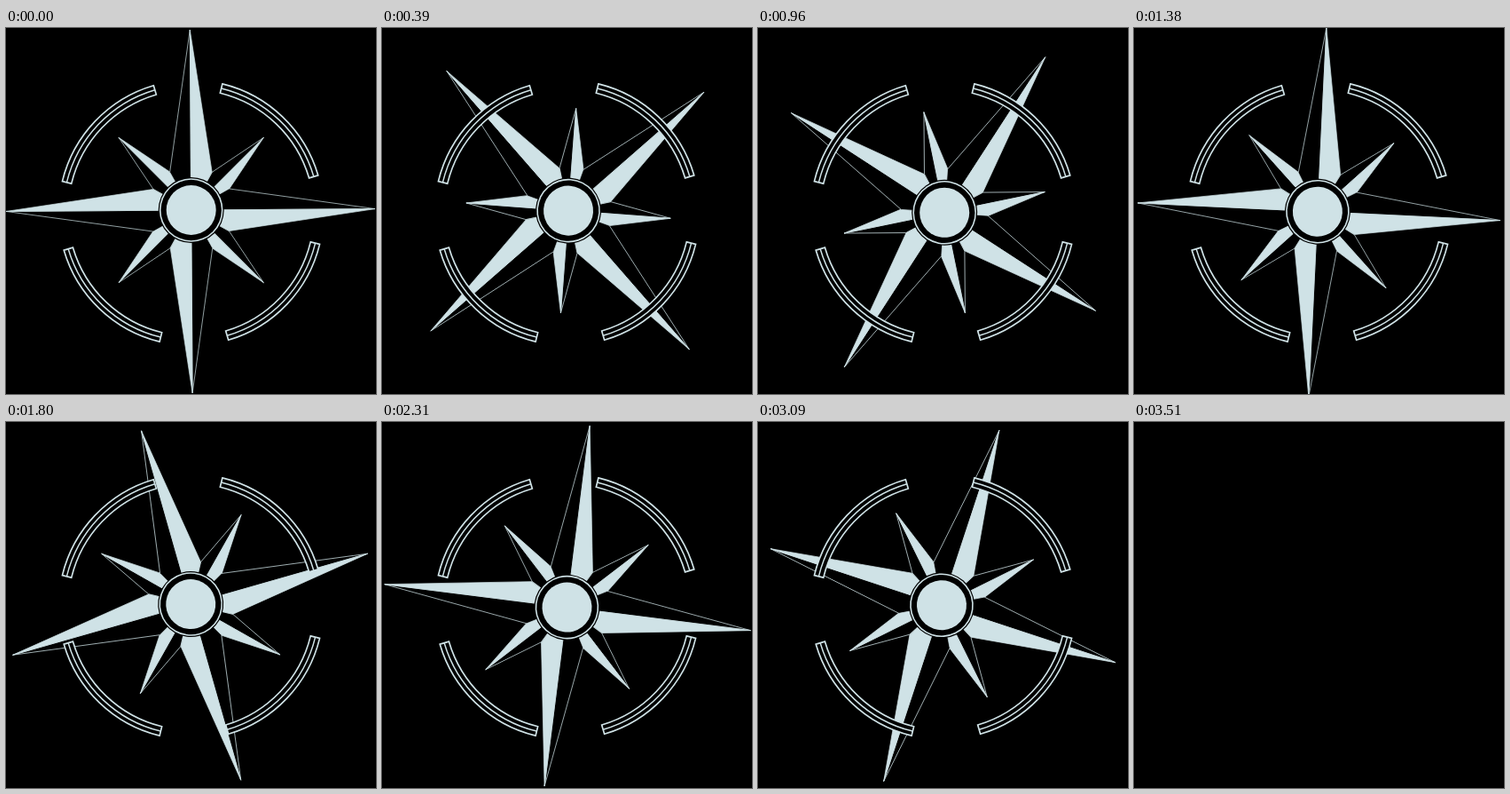
Write an HTML page with a canvas that moves like this. It is 417 px wide and 412 px high and loops after 5370 ms.

```html
<!DOCTYPE html>
<html>
<head>
<meta charset="utf-8">
<style>
  html, body { margin: 0; height: 100%; overflow: hidden; background: #000; }
  canvas { display: block; }
</style>
</head>
<body>
<canvas id="stage" width="417" height="412"></canvas>
<script>
const ctx = document.getElementById('stage').getContext('2d');
const LIGHT = '#cfe2e6', DARK = '#000';
const LOOP = 5370, STEP = 30, FADE_FROM = 3240, FADE_TO = 3510;
const RAD = Math.PI / 180;

// Needle swings: [time in ms, angle in degrees]
const SWING = [[0, 0], [861, 115.6], [1710, 350.3], [2520, 157.3], [3189, 296]];
const LONG = [203, 207.3, 206, 208.7];
const SHORT = 115.5;

function angleAt(t) {
  for (let i = 1; i < SWING.length; i++) {
    const [t0, a0] = SWING[i - 1], [t1, a1] = SWING[i];
    if (t < t1) return a0 + (a1 - a0) * (1 - Math.cos(Math.PI * (t - t0) / (t1 - t0))) / 2;
  }
  return SWING[SWING.length - 1][1];
}

// Point at a bearing, clockwise from up
const polar = (deg, r) => [r * Math.sin(deg * RAD), -r * Math.cos(deg * RAD)];

function triangle(a, b, fill) {
  ctx.beginPath();
  ctx.moveTo(0, 0);
  ctx.lineTo(...a);
  ctx.lineTo(...b);
  ctx.closePath();
  ctx.fillStyle = fill;
  ctx.fill();
  ctx.stroke();
}

function spike(deg, length, spread) {
  const tip = polar(deg, length);
  triangle(tip, polar(deg - spread, 49), DARK);
  triangle(tip, polar(deg + spread, 49), LIGHT);
}

function disc(r, fill) {
  ctx.beginPath();
  ctx.arc(0, 0, r, 0, 2 * Math.PI);
  ctx.fillStyle = fill;
  ctx.fill();
}

function drawStar(deg) {
  ctx.save();
  ctx.translate(208.7, 206.8);
  ctx.rotate(deg * RAD);
  ctx.translate(0, -1.8);
  ctx.lineWidth = 0.7;
  for (let i = 0; i < 4; i++) spike(45 + 90 * i, SHORT, 16);
  LONG.forEach((length, i) => spike(90 * i - 0.4, length, 29));
  disc(37, DARK);
  disc(35.8, LIGHT);
  disc(34.2, DARK);
  disc(28, LIGHT);
  ctx.restore();
}

function drawBands() {
  ctx.save();
  ctx.translate(208.5, 208);
  for (let i = 0; i < 4; i++) {
    const from = (13.7 + 90 * i) * RAD, to = (73.6 + 90 * i) * RAD;
    ctx.beginPath();
    ctx.arc(0, 0, 149.3, from, to);
    ctx.arc(0, 0, 138.7, to, from, true);
    ctx.closePath();
    ctx.fillStyle = DARK;
    ctx.fill();
    ctx.lineWidth = 1.7;
    ctx.stroke();
    ctx.beginPath();
    ctx.arc(0, 0, 144.2, from, to);
    ctx.lineWidth = 1.5;
    ctx.stroke();
  }
  ctx.restore();
}

function draw(now) {
  const t = Math.floor(now % LOOP / STEP) * STEP;
  ctx.globalAlpha = 1;
  ctx.fillStyle = DARK;
  ctx.fillRect(0, 0, 417, 412);
  if (t < FADE_TO) {
    ctx.strokeStyle = LIGHT;
    drawStar(angleAt(t));
    drawBands();
    ctx.globalAlpha = Math.max(0, (t - FADE_FROM) / (FADE_TO - FADE_FROM));
    ctx.fillStyle = DARK;
    ctx.fillRect(0, 0, 417, 412);
  }
}

const start = performance.now();
function tick() {
  draw(performance.now() - start);
  requestAnimationFrame(tick);
}
tick();
</script>
</body>
</html>
```
